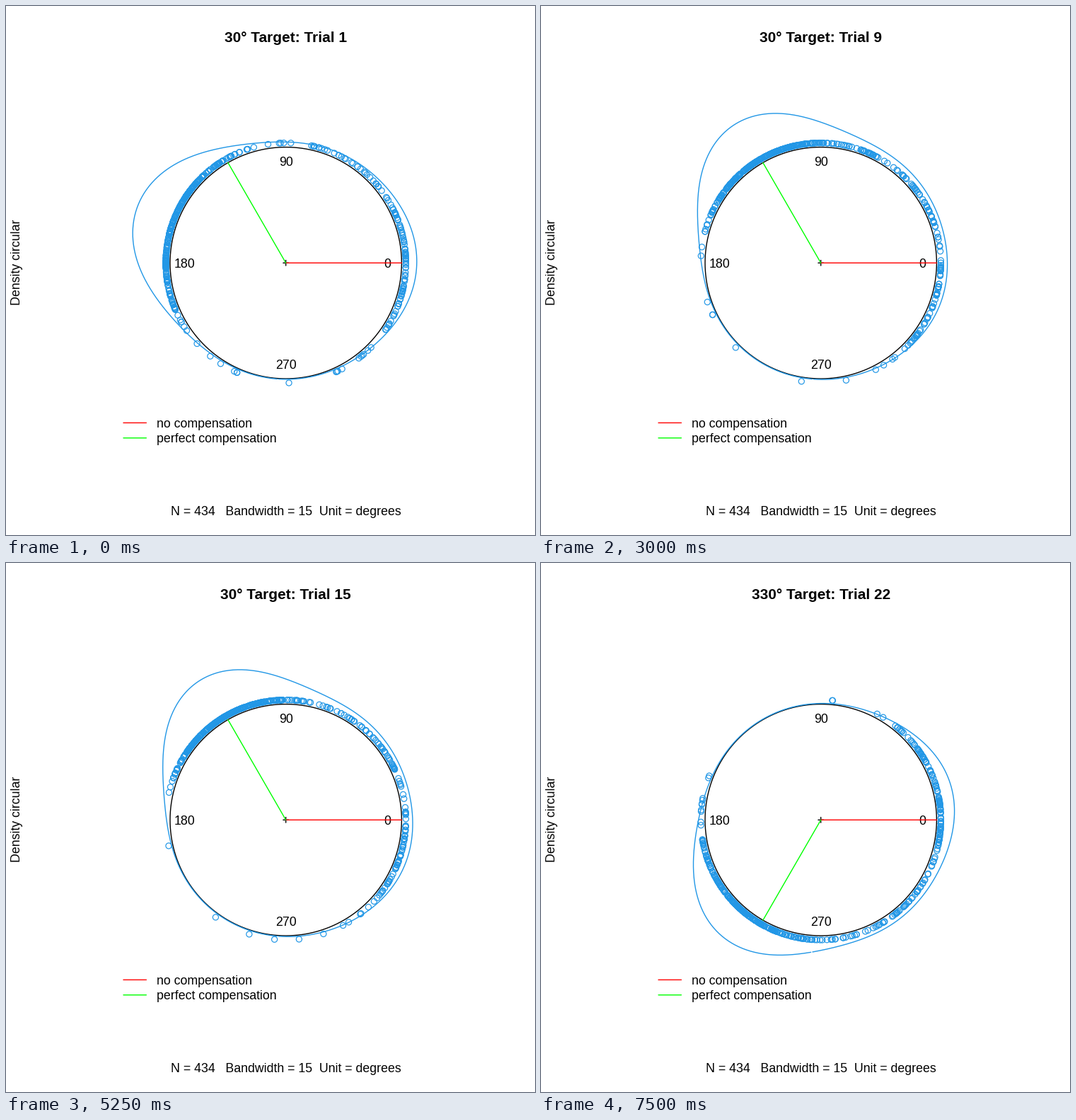
A matplotlib script that plays this animation: 748x748 px, repeating every 8000 ms.

```python
import numpy as np
import matplotlib.pyplot as plt
from matplotlib.animation import FuncAnimation

SIZE, DPI = 748, 68
PX = 72 / DPI                      # points per pixel
CX, CY, R = 395.7, 363.3, 163.7    # unit circle
N = 434                            # dots per trial
KERNEL = 14.8                      # smoothing of the density, degrees
BASE = 0.7                         # even background under the lobes
BLUE, RED, GREEN = "#2297E6", "#FF0000", "#00FF00"

# Lobes (centre, width, height) of the density at key trials
LEARNING = {
    1: [(159, 27.5, 60), (60, 28, 7), (0, 28, 20)],
    5: [(125, 26.5, 56.5), (47, 35, 15), (-20, 28, 7.5)],
    11: [(121.5, 24.5, 68), (50, 31, 14.5), (-18, 27, 14.3)],
    19: [(122.5, 25, 65), (50, 31, 14), (-22, 28, 14.5)],
}
OPPOSITE = [(229, 26, 51), (15, 26, 24.5), (-50, 30, 13)]
TRIALS = [*range(1, 20, 2), 22]
THETA = np.linspace(266.4, 625.7, 720)


def lobes_at(trial):
    """Lobes drift between the key trials, fast at first."""
    if trial > 20:
        return np.array(OPPOSITE)
    keys = np.log(list(LEARNING))
    flat = np.array(list(LEARNING.values())).reshape(len(keys), -1)
    return np.array([np.interp(np.log(trial), keys, col)
                     for col in flat.T]).reshape(-1, 3)


def density(lobes):
    r = np.full(THETA.shape, R + BASE)
    for mu, sd, h in lobes:
        d = (THETA - mu + 180) % 360 - 180
        r += h * np.exp(-0.5 * (d / sd) ** 2)
    return r


def sample(lobes, seed):
    """Dot angles that the density curve would smooth."""
    rng = np.random.default_rng(seed)
    mu, sd, h = lobes.T
    mass = np.append(h * sd * np.sqrt(2 * np.pi), 360 * BASE)
    pick = rng.choice(len(mass), N, p=mass / mass.sum())
    mu = np.append(mu, 0)
    sd = np.append(np.sqrt(sd ** 2 - KERNEL ** 2), 0)
    angles = rng.normal(mu[pick], sd[pick])
    stray = pick == len(lobes)
    angles[stray] = rng.uniform(0, 360, stray.sum())
    return angles


def polar(deg, r):
    a = np.radians(deg)
    return CX + r * np.cos(a), CY - r * np.sin(a)


fig = plt.figure(figsize=(SIZE / DPI, SIZE / DPI), dpi=DPI, facecolor="white")
ax = fig.add_axes([0, 0, 1, 1])
ax.set_xlim(0, SIZE)
ax.set_ylim(SIZE, 0)
ax.axis("off")


def label(x, y, s, size=17.8, **kw):
    return ax.text(x, y, s, fontsize=size * PX, family="Liberation Sans",
                   color="black", va="baseline", **kw)


def stroke(x, y, color, z):
    return ax.plot(x, y, color=color, lw=1.4 * PX, zorder=z, snap=False,
                   solid_capstyle="round")[0]


# Fixed parts
stroke(*polar(np.linspace(0, 360, 721), R), "black", 1)
for angle in (0, 90, 180, 270):
    x, y = polar(angle, 0.875 * R)
    label(x, y + 6.3, str(angle), ha="center", zorder=2)
stroke([CX - 3.8, CX + 3.8], [CY, CY], "black", 2)
stroke([CX, CX], [CY - 3.8, CY + 3.8], "black", 2)
stroke([CX, CX + R], [CY, CY], RED, 5)
for y, color, s in [(589.4, RED, "no compensation"),
                    (610.8, GREEN, "perfect compensation")]:
    stroke([166, 198.4], [y, y], color, 5)
    label(212.8, y + 6.3, s)
label(CX, 720.4, "N = 434   Bandwidth = 15  Unit = degrees", ha="center")
label(19.6, CY - 1, "Density circular", ha="center", rotation=90,
      rotation_mode="anchor")

# Changing parts
title = label(CX, 51, "", 20.9, weight="bold", ha="center")
dots = ax.scatter([], [], s=(8.1 * PX) ** 2, facecolors="none",
                  edgecolors=BLUE, linewidths=1.2 * PX, zorder=3)
curve = stroke([], [], BLUE, 4)
goal = stroke([], [], GREEN, 6)


def draw(i):
    trial = TRIALS[min(i // 3, len(TRIALS) - 1)]
    target = 30 if trial <= 20 else 330
    lobes = lobes_at(trial)
    title.set_text(f"{target}° Target: Trial {trial}")
    dots.set_offsets(np.column_stack(polar(sample(lobes, trial), R + 6)))
    curve.set_data(*polar(THETA, density(lobes)))
    gx, gy = polar(120 if target == 30 else 240, R)
    goal.set_data([CX, gx], [CY, gy])
    return title, dots, curve, goal


anim = FuncAnimation(fig, draw, frames=32, interval=250, repeat=True,
                     repeat_delay=0, blit=False)
plt.show()
```
